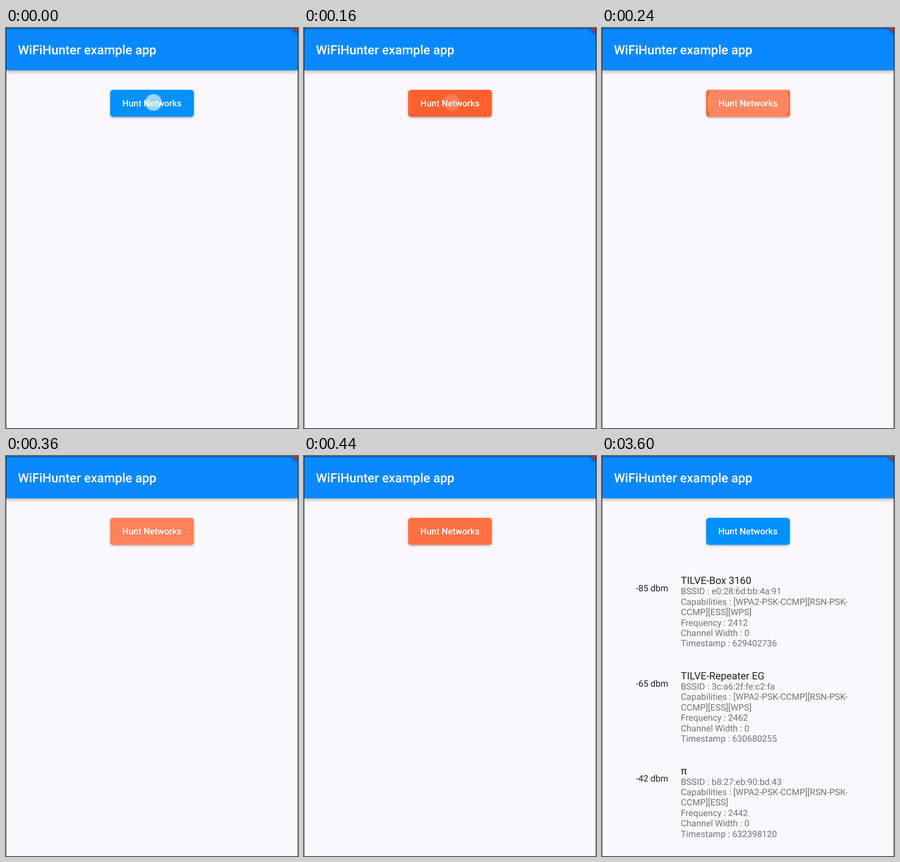
Animation, 600 px wide and 822 px high, one loop 6.68 s. Source, as an HTML page:

```html
<!DOCTYPE html>
<html lang="en">
<head>
<meta charset="utf-8">
<title>Network scan demo</title>
<style>
  html, body { margin: 0; width: 100%; height: 100%; overflow: hidden; background: #faf8fc; }
  svg { display: block; width: 600px; height: 822px; }
  text { font-family: Roboto, Arial, sans-serif; font-size: 18.18px; text-rendering: geometricPrecision; white-space: pre; }
  .bar { fill: #0a89ff; filter: drop-shadow(0 2px 4px rgba(0, 0, 0, .36)); }
  .heading { font-size: 25.97px; font-weight: 500; fill: #fff; }
  .button { filter: drop-shadow(0 2px 2px rgba(0, 0, 0, .3)); }
  .label { font-weight: 500; fill: #fff; }
  .name { font-size: 20.77px; fill: #212022; }
  .level { fill: #212022; }
  .detail { fill: #747376; }
</style>
</head>
<body>
<svg viewBox="0 0 600 822">
  <defs>
    <linearGradient id="topShade" x2="0" y2="1">
      <stop offset="0" stop-color="#013" stop-opacity=".5"/>
      <stop offset=".4" stop-color="#013" stop-opacity=".25"/>
      <stop offset="1" stop-color="#013" stop-opacity="0"/>
    </linearGradient>
    <radialGradient id="touch">
      <stop offset="0" stop-color="#fff" stop-opacity=".55"/>
      <stop offset=".8" stop-color="#fff" stop-opacity=".65"/>
      <stop offset=".84" stop-color="#fff" stop-opacity=".22"/>
      <stop offset="1" stop-color="#fff" stop-opacity="0"/>
    </radialGradient>
    <clipPath id="buttonClip"><rect x="214" y="127" width="172" height="55.5" rx="6"/></clipPath>
    <clipPath id="barClip"><rect width="600" height="87"/></clipPath>
  </defs>

  <rect width="600" height="822" fill="#faf8fc"/>
  <rect class="bar" width="600" height="87"/>
  <rect width="600" height="4" fill="url(#topShade)"/>
  <g clip-path="url(#barClip)">
    <path d="M588 0H600V12Z" fill="#94404f" style="filter:drop-shadow(-1px 1px 3px rgba(0,0,0,.6))"/>
  </g>
  <text class="heading" x="24.4" y="53.6">WiFiHunter example app</text>

  <rect id="button" class="button" x="214" y="127" width="172" height="55.5" rx="6"/>
  <g clip-path="url(#buttonClip)"><circle id="ripple" fill="#fff"/></g>
  <text class="label" x="299.8" y="160.8" text-anchor="middle">Hunt Networks</text>
  <circle id="dot" cx="303" cy="153" r="20" fill="url(#touch)"/>

  <g id="list"></g>
  <path d="M.5 0V822M599.5 0V822" stroke="#000" stroke-opacity=".66"/>
</svg>

<script>
const LOOP = 6680, STEP = 40, PITCH = 195.6, LINE = 21.39;
const PRESSED = 80, FOUND = 3600;
const el = id => document.getElementById(id);
const clamp = v => Math.max(0, Math.min(1, v));
const mix = (a, b, k) => a + (b - a) * k;

const networks = [
  { level: -85, name: "TILVE-Box 3160", bssid: "e0:28:6d:bb:4a:91", caps: "[ESS][WPS]", freq: 2412, stamp: 629402736 },
  { level: -65, name: "TILVE-Repeater EG", bssid: "3c:a6:2f:fe:c2:fa", caps: "[ESS][WPS]", freq: 2462, stamp: 630680255 },
  { level: -42, name: "π", bssid: "b8:27:eb:90:bd:43", caps: "[ESS]", freq: 2442, stamp: 632398120 }
];

function addText(kind, x, y, content) {
  const node = document.createElementNS("http://www.w3.org/2000/svg", "text");
  node.setAttribute("class", kind);
  node.setAttribute("x", x);
  node.setAttribute("y", y);
  node.textContent = content;
  el("list").append(node);
}

networks.forEach((net, i) => {
  const top = i * PITCH;
  addText("level", 69.8, 278 + top, `${net.level} dbm`);
  addText("name", 162, 262.9 + top, net.name);
  [
    `BSSID : ${net.bssid}`,
    "Capabilities : [WPA2-PSK-CCMP][RSN-PSK-",
    `CCMP]${net.caps}`,
    `Frequency : ${net.freq}`,
    "Channel Width : 0",
    `Timestamp : ${net.stamp}`
  ].forEach((line, n) => addText("detail", 162, 284.4 + top + n * LINE, line));
});

function draw(time) {
  const t = Math.floor(time / STEP) * STEP;
  const busy = t >= PRESSED && t < FOUND;
  el("button").setAttribute("fill", busy ? "#ff602e" : "#0091ff");
  el("list").style.display = t >= FOUND ? "" : "none";
  el("dot").setAttribute("opacity", t < FOUND ? clamp(1 - t / 220) : 0);

  // The ripple grows from the touch point to the button centre, then fades.
  const grow = clamp((t - 160) / 87);
  const ripple = el("ripple");
  ripple.setAttribute("cx", mix(303, 300, grow));
  ripple.setAttribute("cy", mix(153, 154.8, grow));
  ripple.setAttribute("r", t < 280 ? mix(27, 89, grow) : 100);
  const alpha = clamp((t - 160) / 50) * clamp((520 - t) / 180);
  ripple.setAttribute("opacity", .24 * alpha);
}

const start = performance.now();
function tick() {
  draw((performance.now() - start) % LOOP);
  requestAnimationFrame(tick);
}
tick();
</script>
</body>
</html>
```
